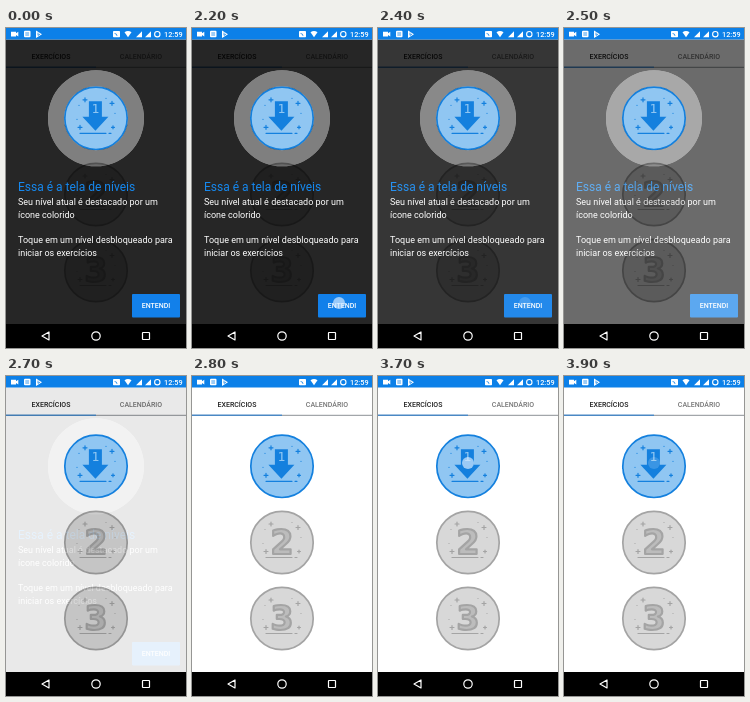
An HTML page that plays this animation: 180x320 px, repeating every 4000 ms.

```html
<!DOCTYPE html>
<html lang="pt">
<head>
<meta charset="utf-8">
<style>
  html, body { margin: 0; width: 100%; height: 100%; overflow: hidden; background: #fff; }
  svg { display: block; width: 100%; height: 100%; font-family: Roboto, sans-serif; }
  .label { font-size: 7px; font-weight: 500; text-anchor: middle; }
  .line { fill: none; stroke-linecap: round; }
</style>
</head>
<body>
<svg viewBox="0 0 180 320">
  <rect width="180" height="320" fill="#fff"/>

  <text class="label" x="45" y="31" fill="#222">EXERCÍCIOS</text>
  <text class="label" x="135" y="31" fill="#757575">CALENDÁRIO</text>
  <path d="M0 39.3H90" stroke="#4a88c4" stroke-width="1.4"/>
  <path d="M90 39.3H180" stroke="#a2a6aa" stroke-width="1.2"/>

  <g id="levels"></g>

  <g id="guide">
    <path fill="#000" fill-opacity=".85" fill-rule="evenodd"
      d="M0 11.5H180V296H0ZM42 90.3a48 48 0 1 0 96 0a48 48 0 1 0-96 0Z"/>
    <path fill="#000" fill-opacity=".5" fill-rule="evenodd"
      d="M42 90.3a48 48 0 1 0 96 0a48 48 0 1 0-96 0ZM58 90.3a32 32 0 1 0 64 0a32 32 0 1 0-64 0Z"/>
    <text x="12" y="162.7" font-size="12" fill="#1688ee">Essa é a tela de níveis</text>
    <g font-size="9" fill="#fff">
      <text x="12" y="176.7">Seu nível atual é destacado por um</text>
      <text x="12" y="189.7">ícone colorido</text>
      <text x="12" y="214.5">Toque em um nível desbloqueado para</text>
      <text x="12" y="227.5">iniciar os exercícios</text>
    </g>
    <rect x="126" y="266" width="48" height="23.5" rx="1" fill="#1280ea"/>
    <text class="label" x="150" y="280.2" font-weight="700" fill="#fff">ENTENDI</text>
  </g>

  <circle id="touch" r="6" fill="#d4eaff"/>

  <!-- status bar -->
  <rect width="180" height="11.5" fill="#0c80e8"/>
  <g fill="#fff">
    <path d="M5 3.8h5v1.5l2.3-1.5v4.6l-2.3-1.5v1.5h-5z"/>
    <rect x="18" y="2.8" width="6.5" height="6.5" rx="1"/>
    <path d="M30 2.5l6 3.7-6 3.7z"/>
    <rect x="107" y="3" width="7" height="6.3" rx=".7"/>
    <path d="M118.5 4.3q3.5-2.6 7 0l-3.5 5z"/>
    <path d="M130 9.3h6v-6zM139 9.3h6v-6z"/>
    <text x="158" y="9" font-size="7.3" font-weight="500">12:59</text>
  </g>
  <circle class="line" cx="151.3" cy="6.2" r="2.7" stroke="#fff" stroke-width="1.1"/>
  <path class="line" stroke="#0c80e8" stroke-width=".8" d="M19.7 5h3M19.7 7h3M109 5.5q2 0 2 2M32 5v2.4l1.8-1.2"/>

  <!-- navigation bar -->
  <rect y="296" width="180" height="24" fill="#000"/>
  <g fill="none" stroke="#fff" stroke-width="1.2" stroke-linejoin="round">
    <path d="M43 304v8l-7-4z"/>
    <circle cx="90" cy="308" r="4.2"/>
    <rect x="136.5" y="304.5" width="7" height="7" rx=".5"/>
  </g>
</svg>
<script>
const $ = id => document.getElementById(id);
const LOOP = 4000, STEP = 100;
const guide = $('guide'), touch = $('touch');

const plus = (x, y, r = 2) => `M${x - r} ${y}h${2 * r}M${x} ${y - r}v${2 * r}`;
const dot = (x, y) => `M${x} ${y}h.01`;
const sparkles = plus(-11, -18.5) + plus(16, -15) + plus(-16, 9) + plus(17, 9, 1.5) +
  dot(-17, -13) + dot(10, -20) + dot(19, -5) + dot(-19, 1);

function level(n, y, fill, edge, inner) {
  const icon = n === 1
    ? `<g transform="translate(-.6 0)">
       <path d="M-6.5-17H6.5V-1.5H13L0 12.5L-13-1.5H-6.5Z" fill="${edge}"/>
       <text y="-5.5" font-size="13" text-anchor="middle" fill="${inner}"
         font-family="'DejaVu Sans Mono', monospace">1</text></g>`
    : `<text y="11.5" font-size="33" font-weight="700" text-anchor="middle"
         font-family="'DejaVu Sans', sans-serif" stroke-linejoin="round"
         fill="${inner}" stroke="${edge}" stroke-width="2.2">${n}</text>`;
  return `<g transform="translate(90 ${y})">
    <circle r="31.2" fill="${fill}" stroke="${edge}" stroke-width="1.7"/>
    <path class="line" d="${sparkles}" stroke="${edge}" stroke-width="1.2"/>
    <path class="line" d="M-16 15H10M13 15h2" stroke="${edge}" stroke-width="1.2"/>${icon}</g>`;
}

$('levels').innerHTML =
  level(1, 90.3, '#90c6f2', '#1480de', '#90c6f2') +
  level(2, 166.5, '#d8d8d8', '#a4a4a4', '#bcbcbc') +
  level(3, 242.5, '#d8d8d8', '#a4a4a4', '#bcbcbc');

// Guide fade: eased over half a second
function guideOpacity(t) {
  const p = Math.min(1, Math.max(0, (t - 2315) / 485));
  return (1 + Math.cos(Math.PI * p)) / 2;
}

function tap(x, y, opacity) {
  touch.setAttribute('cx', x);
  touch.setAttribute('cy', y);
  touch.setAttribute('opacity', opacity);
}

function frame(now) {
  const t = Math.floor(now % LOOP / STEP) * STEP;
  guide.setAttribute('opacity', guideOpacity(t));
  if (t >= 3700) tap(90, 87, .7 - (t - 3700) / 400);
  else if (t >= 2200 && t < 2500) tap(147, 275, .7 - (t - 2200) / 400);
  else tap(0, 0, 0);
  requestAnimationFrame(frame);
}
requestAnimationFrame(frame);
</script>
</body>
</html>
```
